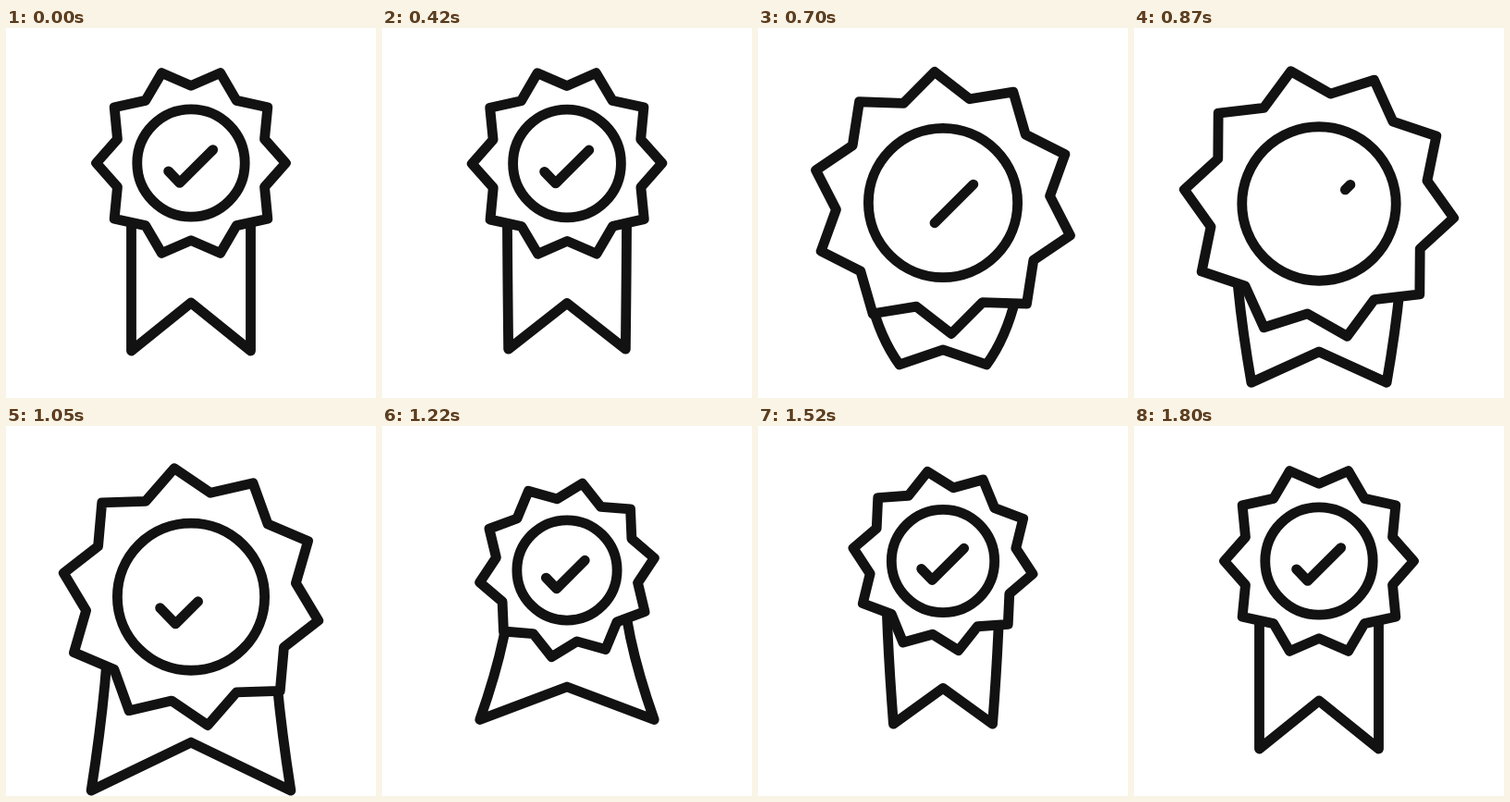
These frames come from a looping animation (400 px wide and 400 px high, 1.82 s). An HTML page:

```html
<!DOCTYPE html>
<html lang="en">
<head>
<meta charset="utf-8">
<title>Award badge</title>
<style>
  html, body { margin: 0; height: 100%; overflow: hidden; background: #fff; }
  svg { display: block; width: 100vw; height: 100vh; }
  path, circle {
    fill: #fff; stroke: #121212; stroke-width: 10.8;
    stroke-linecap: round; stroke-linejoin: round;
  }
  #ribbon, #check { fill: none; }
</style>
</head>
<body>
<svg viewBox="0 0 400 400">
  <path id="ribbon"/>
  <path id="star"/>
  <circle id="ring" cx="200"/>
  <path id="check" pathLength="1"/>
</svg>
<script>
const LOOP = 1820, START = 420, END = 1800;
const $ = id => document.getElementById(id);
const ribbon = $('ribbon'), star = $('star'), ring = $('ring'), check = $('check');

const ramp = (t, a, b) => Math.min(1, Math.max(0, (t - a) / (b - a)));
const ease = (t, a, b) => { const u = ramp(t, a, b); return u * u * (3 - 2 * u); };

// The badge swells and winds back, springs past its rest pose, then settles.
const scale = t => 1 + .43 * ease(t, 400, 775) - .52 * ease(t, 995, 1250) + .09 * ease(t, 1250, 1775);
const centerY = t => 146 + 44 * (ease(t, 400, 730) - ease(t, 972, 1330));
const turn = t => -30 * ease(t, 400, 860) + 39 * ease(t, 940, 1455) - 9 * ease(t, 1455, 1800);

// The ribbon folds in at a steady pace, flares out, and trails the badge back.
const fold = t => ramp(t, 400, 700);
const notchY = t => 297 + 53 * ease(t, 400, 740) - 76 * ease(t, 993, 1277) + 23 * ease(t, 1300, 1800);
const tail = t => 52 - 36 * (fold(t) - ease(t, 700, 1050)) - 17 * (ease(t, 1050, 1240) - ease(t, 1400, 1800));
const spread = t => 64.5 - 17.5 * fold(t) + 62 * ease(t, 700, 1080) - 57 * ease(t, 1100, 1460) + 12.5 * ease(t, 1440, 1800);
const bend = t => .4 + .27 * (fold(t) - ease(t, 700, 920));

// The check mark is wiped from its start, then drawn again.
const erase = t => ramp(t, 400, 890) ** 2;
const redraw = t => 1 - (1 - ramp(t, 870, 1335)) ** 2;

function starPath(y, s, deg) {
  const pts = [];
  for (let i = 0; i < 20; i++) {
    const r = s * (i % 2 ? 83.6 : 102.4), a = (deg + i * 18) * Math.PI / 180;
    pts.push(`${200 + r * Math.cos(a)},${y + r * Math.sin(a)}`);
  }
  return `M${pts.join('L')}Z`;
}

function ribbonPath(t, y, s) {
  const top = 64.5 * s, notch = notchY(t), foot = notch + tail(t), w = spread(t);
  const mid = y + (foot - y) * bend(t);
  return `M${200 - top},${y}Q${200 - top},${mid} ${200 - w},${foot}`
    + `L200,${notch}L${200 + w},${foot}Q${200 + top},${mid} ${200 + top},${y}`;
}

function drawCheck(t, y, s) {
  const at = (dx, dy) => `${200 + dx * s},${y + dy * s}`;
  const wiping = t < 880;
  const from = wiping ? erase(t) : 0, to = wiping ? 1 : redraw(t);
  check.setAttribute('d', `M${at(-24.4, 8.8)}L${at(-12.2, 21.4)}L${at(23.7, -14.4)}`);
  check.style.strokeDasharray = `${to - from} 2`;
  check.style.strokeDashoffset = -from;
}

function draw(t) {
  const y = centerY(t), s = scale(t);
  ribbon.setAttribute('d', ribbonPath(t, y, s));
  star.setAttribute('d', starPath(y, s, turn(t)));
  ring.setAttribute('cy', y);
  ring.setAttribute('r', 58.2 * s);
  drawCheck(t, y, s);
}

// The motion advances at 40 steps a second: 0, 20, 50, 70, 100 ms...
function step(t) {
  if (t < START || t >= END) return 0;
  const part = t % 50;
  return t - part + (part >= 20 ? 20 : 0);
}

const begin = performance.now();
function tick() {
  draw(step((performance.now() - begin) % LOOP));
  requestAnimationFrame(tick);
}
tick();
</script>
</body>
</html>
```
